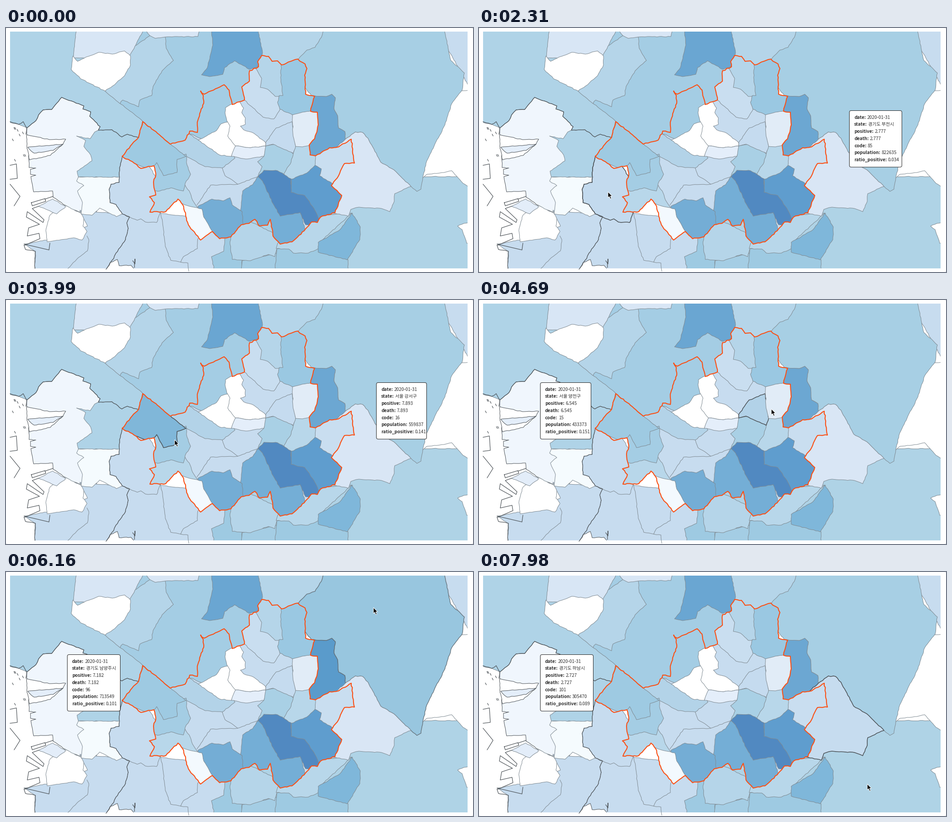
Animation of 1032 by 542 pixels, one loop 8 s. Source, as a matplotlib script:

```python
import math
import random

import numpy as np
import matplotlib.pyplot as plt
from matplotlib.animation import FuncAnimation
from matplotlib.patches import FancyBboxPatch, Polygon, Rectangle
from matplotlib.path import Path

W, H, DPI = 1032, 542, 100
PX = 72 / DPI
STEP, FRAMES, TICK = 40, 200, 70
THIN, DARK, RIM = "#7f8a92", "#4c5257", "#fb4f14"
PALE, SKY, MIST = "#c7dcef", "#a4cde4", "#b5d5e9"

fig = plt.figure(figsize=(W / DPI, H / DPI), dpi=DPI, facecolor="#e6e6e6")
ax = fig.add_axes([0, 0, 1, 1])
ax.set(xlim=(0, W), ylim=(H, 0))
ax.axis("off")
ax.add_patch(FancyBboxPatch((4, 4), W - 8, H - 8, boxstyle="round,pad=4,rounding_size=4",
                            fc="white", ec="none", zorder=0))
view = Rectangle((9, 8), 1011, 526, transform=ax.transData)


def pts(*flat):
    return [tuple(p) for p in np.reshape(flat, (-1, 2))]


def rough(points, amp=0.8):
    """Add small natural wiggles; an edge looks the same from both sides."""
    out = []
    for a, b in zip(points, points[1:]):
        lo, hi = sorted((a, b))
        n = max(1, int(math.dist(a, b) / 5))
        rng = random.Random(str((*map(int, lo), *map(int, hi))))
        mids = [(lo[0] + (hi[0] - lo[0]) * k / n + rng.uniform(-amp, amp),
                 lo[1] + (hi[1] - lo[1]) * k / n + rng.uniform(-amp, amp))
                for k in range(1, n)]
        out += [a] + (mids if lo == a else mids[::-1])
    return out + [points[-1]]


layer = 1
clip = None
hover = {}


def area(color, points, key=None, hot=None, amp=0.8, edge=THIN):
    """Add a district above all earlier ones, with an optional hover copy."""
    global layer
    layer += 1
    shape = rough(points + points[:1], amp)
    styles = [(color, edge, 1, 0)]
    if key:
        styles.append((hot, DARK, 1.5, 0.5))
    for fill, stroke, width, dz in styles:
        p = ax.add_patch(Polygon(shape, fc=fill, ec=stroke, lw=width * PX,
                                 zorder=layer + dz, joinstyle="round"))
        if clip:
            p.set_clip_path(clip, ax.transData)
        else:
            p.set_clip_path(view)
        if dz:
            p.set_visible(False)
            hover[key] = p


def line(points, color=DARK, lw=1.2, amp=0.8, z=90):
    xs, ys = zip(*rough(points, amp))
    ax.plot(xs, ys, color=color, lw=lw * PX, zorder=z, solid_joinstyle="round",
            clip_path=view)


# ---- shared borders
gimpo_s = pts(46, 222, 66, 206, 72, 193, 82, 182, 101, 181, 123, 154, 155, 167, 172, 173,
              170, 180, 187, 186, 185, 196, 208, 219, 204, 227)
gyeyang_n = pts(204, 227, 234, 226, 256, 242, 268, 236, 292, 243)
bucheon_w = pts(257, 285, 251, 310, 250, 343, 232, 347, 228, 358, 230, 388, 243, 392, 257, 413)
namdong_e = pts(257, 413, 273, 420, 267, 433, 270, 445, 264, 470, 243, 500, 238, 512, 221, 536)
hanam_n = pts(750, 247, 772, 231, 788, 232, 800, 245, 828, 298, 857, 315, 895, 352)
guri_e = pts(675, 150, 708, 152, 720, 147, 728, 155, 725, 180, 733, 195, 735, 222,
             749, 230, 750, 247)
rim_n = pts(257, 285, 275, 262, 293, 243, 302, 208, 363, 258, 396, 249, 406, 229, 423, 232,
            424, 205, 437, 167, 436, 150, 430, 140, 438, 147, 482, 126, 493, 138, 500, 170,
            527, 160, 521, 131, 538, 118, 538, 95, 558, 86, 556, 75, 565, 61, 580, 63,
            588, 74, 600, 73, 609, 82, 645, 69, 661, 80, 665, 90, 660, 105, 662, 147,
            682, 152, 673, 185, 688, 187, 690, 215, 682, 246)
rim_s = pts(670, 260, 672, 282, 684, 284, 715, 266, 735, 264, 763, 247, 770, 300, 748, 301,
            735, 328, 719, 350, 742, 372, 727, 410, 695, 420, 688, 432, 675, 431, 652, 458,
            632, 475, 606, 480, 590, 462, 584, 425, 578, 438, 560, 440, 550, 425, 537, 434,
            520, 437, 497, 464, 472, 468, 456, 452, 430, 471, 403, 437, 390, 392, 380, 380)
rim_w = pts(353, 408, 318, 409, 328, 388, 317, 375, 331, 371, 326, 342, 331, 327, 327, 306,
            298, 312, 283, 300, 257, 285)
rim = rim_n + rim_s + rim_w

# ---- north and west
area("#afd3e7", pts(0, 208, 0, 0, 160, 0, 302, 207, 292, 243, 150, 300, 46, 222, 28, 214))
area(SKY, pts(219, 140, 302, 207, 363, 258, 450, 300, 620, 160, 600, 0, 160, 0))
area("#d8e6f5", pts(156, 0, 148, 66, 270, 70, 306, 0))
area(MIST, pts(274, 60, 285, 40, 318, 17, 352, 20, 354, 45, 370, 72, 345, 95, 325, 130,
               322, 150, 296, 160, 293, 175, 258, 160, 252, 168, 219, 140))
area("#ffffff", pts(148, 62, 158, 74, 182, 63, 205, 54, 235, 58, 262, 51, 275, 62, 275, 82,
                    262, 106, 240, 126, 219, 140, 165, 113, 144, 92))
area("#d8e6f5", pts(303, 0, 318, 17, 330, 23, 352, 20, 424, 19, 428, 0))
area(MIST, pts(555, 0, 565, 100, 660, 90, 720, 0))
area("#6aa6d2", pts(454, 0, 457, 38, 445, 88, 432, 104, 450, 108, 479, 103, 483, 88, 505, 73,
                    538, 92, 556, 86, 567, 55, 556, 0))
area("#f0f6fd", gimpo_s + pts(200, 420, 145, 403, 104, 376, 103, 362, 61, 364, 55, 330,
                              66, 327, 54, 325, 54, 314, 66, 311, 51, 310, 50, 264, 46, 236),
     edge=DARK)
area("#ffffff", pts(46, 237, 96, 248, 132, 247, 126, 258, 98, 283, 52, 293, 46, 262), edge=DARK)
area("#e4eefa", pts(48, 265, 90, 261, 126, 258, 104, 272, 62, 278), edge=DARK)
area("#afd3e7", gyeyang_n + pts(300, 290, 260, 332, 160, 331, 157, 318, 190, 295, 187, 282,
                                172, 263, 176, 250, 156, 240, 186, 246, 196, 231))

# ---- south and east
area("#afd3e6", pts(500, 330, 1040, 330, 1040, 550, 450, 550))
area(PALE, pts(240, 400, 500, 430, 480, 545, 210, 545))
area(PALE, namdong_e + pts(64, 545, 64, 496, 40, 480, 95, 470, 180, 440, 163, 405))
area("#f5fbfe", pts(160, 331, 255, 331, 257, 413, 244, 419, 207, 400, 190, 416, 166, 413,
                    169, 388, 158, 362, 172, 350, 156, 340))
area("#ffffff", pts(97, 416, 130, 394, 165, 411, 172, 424, 170, 440, 179, 452, 168, 471,
                    150, 466, 91, 475, 88, 450))
area("#e3edf9", pts(72, 396, 103, 380, 132, 397, 112, 413))
line(pts(179, 462, 183, 470, 180, 495, 160, 510, 137, 534), THIN, 1, z=layer)
line(pts(341, 408, 346, 432, 352, 485, 364, 516, 386, 520, 392, 508, 423, 490, 424, 468),
     THIN, 1, z=layer)
line(pts(386, 520, 402, 522, 404, 540), THIN, 1, z=layer)
area("#ffffff", pts(221, 538, 230, 521, 246, 514, 250, 528, 276, 527, 286, 540), edge=DARK)
area("#9ecae2", pts(484, 460, 481, 496, 454, 508, 462, 545, 522, 545, 520, 460))
area(SKY, pts(522, 517, 520, 545, 610, 545, 600, 500))
area("#9ecae2", pts(594, 545, 598, 490, 700, 480, 756, 515, 756, 545))
area(MIST, pts(497, 455, 495, 480, 500, 514, 540, 517, 580, 503, 594, 508, 598, 492,
               620, 470, 520, 420))
area("#b8d7ea", pts(604, 470, 597, 490, 625, 491, 635, 500, 668, 500, 690, 490, 700, 470,
                    764, 411, 640, 420))
area("#7fb7da", pts(765, 411, 783, 442, 782, 470, 754, 515, 690, 498, 690, 476, 738, 448))
area(PALE, pts(950, 0, 1040, 0, 1040, 160))
area("#ffffff", pts(1040, 139, 980, 139, 900, 300, 921, 333, 930, 325, 968, 321, 985, 317,
                    1010, 345, 1040, 364), amp=0.4)
area("#ffffff", pts(1040, 428, 1012, 434, 998, 440, 1008, 448, 1018, 478, 1040, 478))
area(PALE, bucheon_w + pts(290, 427, 298, 424, 308, 431, 333, 432, 341, 408, 360, 380,
                           300, 280), "bucheon", "#c3daee")
area("#6ca7d2", guri_e + pts(740, 275, 660, 295, 650, 170), "guri", "#4a90c5")
area("#a7cfe4", guri_e + hanam_n
     + pts(908, 363, 917, 358, 921, 333, 930, 295, 970, 215, 985, 168, 1008, 138, 1013, 100,
           983, 72, 977, 45, 968, 0, 702, 0, 699, 15, 683, 43, 665, 49, 647, 68, 630, 90),
     "namyang", "#8abedc")
area("#d9e6f5", hanam_n + pts(859, 368, 858, 385, 848, 408, 830, 401, 780, 398, 762, 403,
                              757, 418, 722, 411, 690, 400, 690, 300),
     "hanam", "#c6dcef")

# ---- inner districts, clipped to the rim
clip = Path(rough(rim, 1.1))
area(PALE, rim)
line(pts(422, 393, 452, 349, 512, 347, 557, 330), THIN, 1, z=layer)
line(pts(478, 311, 484, 328, 512, 347), THIN, 1, z=layer)
area(SKY, pts(390, 225, 420, 110, 510, 110, 515, 165, 490, 240, 440, 250, 403, 233))
area("#b3d3e8", pts(350, 255, 390, 230, 403, 233, 425, 249, 490, 265, 506, 289, 478, 311,
                    440, 308, 398, 285))
area("#c9def0", pts(510, 160, 510, 110, 550, 75, 600, 100, 606, 180, 592, 202, 568, 198,
                    527, 160))
area(MIST, pts(545, 80, 565, 50, 630, 70, 625, 150, 595, 152, 578, 136, 562, 132, 565, 112,
               557, 98))
area("#9ac8e2", pts(609, 70, 660, 55, 700, 140, 680, 190, 633, 193, 605, 180, 600, 165,
                    604, 150, 612, 150, 607, 110))
area("#ffffff", pts(425, 249, 465, 228, 475, 213, 500, 206, 510, 262, 498, 285, 472, 282))
area("#ffffff", pts(484, 188, 485, 177, 515, 160, 525, 178, 521, 188, 529, 200, 529, 214,
                    518, 218, 525, 226, 548, 234, 574, 255, 574, 262, 540, 266, 507, 262,
                    490, 240, 495, 218, 488, 206))
area("#e4eefa", pts(507, 262, 540, 266, 574, 262, 575, 270, 570, 285, 530, 291, 498, 285,
                    500, 278))
area("#a9d0e5", pts(574, 262, 610, 255, 645, 290, 620, 330, 556, 332, 566, 308, 556, 297,
                    570, 285))
area("#b8d7ea", pts(635, 278, 640, 255, 690, 255, 690, 310, 630, 345, 614, 324, 630, 298))
area("#c9def0", pts(684, 275, 775, 230, 785, 310, 730, 355, 690, 330, 683, 305))
area("#74aed6", pts(523, 362, 545, 348, 557, 330, 650, 400, 665, 470, 600, 495, 515, 445))
area("#5f9dce", pts(630, 336, 665, 322, 683, 305, 697, 313, 693, 328, 755, 365, 745, 420,
                    690, 440, 630, 380))
area("#5189c1", pts(557, 330, 570, 316, 600, 317, 630, 335, 630, 365, 660, 372, 680, 400,
                    700, 440, 662, 437, 650, 410, 606, 418, 590, 390, 567, 340))
area("#74add5", pts(424, 396, 455, 380, 480, 384, 495, 377, 500, 393, 522, 408, 524, 445,
                    500, 475, 440, 475))
area("#b8d7ea", pts(320, 345, 392, 345, 405, 362, 412, 382, 424, 400, 390, 430, 300, 420))
area("#f3f9fe", pts(375, 385, 410, 397, 433, 402, 437, 420, 456, 452, 460, 480, 415, 485))
area(SKY, pts(310, 300, 398, 280, 400, 304, 408, 325, 396, 345, 392, 362, 365, 355, 340, 362,
              315, 362), "yangcheon", "#86bcdc")
area("#9ecae2", pts(302, 195, 363, 257, 398, 285, 378, 292, 378, 321, 348, 328, 333, 299,
                    320, 315, 240, 285), "gangseo", "#80b7d9")
area("#c5dbef", pts(632, 208, 608, 218, 597, 222, 574, 254, 574, 262, 590, 258, 635, 278,
                    640, 263), "dongdaemun", "#b2d2e8")
area("#e1ecf7", pts(633, 193, 655, 187, 700, 180, 690, 258, 655, 264, 640, 263, 634, 235),
     "jungnang", "#d8e5f4")

# ---- strong borders, coast and harbour
line(rim, RIM, 2.1, 1.1, 95)
line(gimpo_s + gyeyang_n[1:])
line(bucheon_w + namdong_e[1:])
line(pts(9, 208, 28, 214, 38, 208, 46, 222, 44, 236))
line(pts(9, 305, 23, 302, 25, 334, 9, 336), amp=0)
line(pts(9, 347, 31, 374, 18, 395), amp=0)
line(pts(56, 388, 86, 379, 88, 385, 58, 395, 56, 388), amp=0)
line(pts(86, 380, 104, 374), amp=0)
line(pts(72, 396, 58, 401, 84, 426, 82, 432, 47, 408, 45, 420, 74, 436, 50, 444, 47, 462,
         73, 456, 75, 468, 40, 483), amp=0)
line(pts(40, 480, 95, 493, 97, 478), amp=0)
line(pts(40, 483, 43, 492, 65, 496, 64, 534))
line(pts(280, 517, 285, 524, 285, 513, 284, 532), amp=0.5)
rng = random.Random(4)
for _ in range(9):
    x, y = rng.uniform(12, 44), rng.uniform(212, 298)
    line([(x, y), (x + 2, y + 4)], amp=0)

# ---- tooltip
TIPS = {
    "bucheon": ("경기도 부천시", 2.777, 85, 822635, 117),
    "gangseo": ("서울 강서구", 7.893, 16, 559837, 112),
    "yangcheon": ("서울 양천구", 6.545, 15, 433373, 113),
    "jungnang": ("서울 중랑구", 2.174, 7, 380307, 117),
    "guri": ("경기도 구리시", 9.524, 94, 203553, 117),
    "namyang": ("경기도 남양주시", 7.182, 96, 713549, 118),
    "hanam": ("경기도 하남시", 2.727, 101, 305470, 118),
}
KEYS = ("date", "state", "positive", "death", "code", "population", "ratio_positive")
FONT = dict(family="Noto Sans CJK JP", size=10 * PX, color="#333333", zorder=101)

box = ax.add_patch(FancyBboxPatch((0, 0), 1, 1, boxstyle="round,pad=0,rounding_size=4",
                                  fc="white", ec="#222222", lw=PX, zorder=100))
renderer = fig.canvas.get_renderer()
labels, values, offsets = [], [], []
for i, key in enumerate(KEYS):
    y = 201.6 + 15.75 * i
    label = ax.text(0, y, key + ":", weight="bold", **FONT)
    offsets.append(label.get_window_extent(renderer).width + 2.5)
    labels.append(label)
    values.append(ax.text(0, y, "", **FONT))

# ---- pointer
ARROW = np.array(pts(0, 0, 0, 13, 3, 10.4, 5.2, 15.6, 7.5, 14.6, 5.3, 9.6, 9.2, 9.4))
pointer = ax.add_patch(Polygon(ARROW, fc="black", ec="white", lw=PX, zorder=110))

MOVES = (
    (980, 1190, pts(335, 333, 277, 366, 285, 364)),
    (2940, 3710, pts(285, 364, 366, 312)),
    (3990, 4690, pts(366, 312, 646, 242)),
    (5320, 6090, pts(646, 242, 704, 225, 812, 79)),
    (6720, 7070, pts(812, 79, 789, 338)),
    (7140, 7210, pts(789, 338, 781, 366)),
    (7770, 7980, pts(781, 366, 858, 471)),
)
HOVERS = ((1750, "bucheon"), (3150, "yangcheon"), (3290, "gangseo"), (4130, "yangcheon"),
          (4480, "dongdaemun"), (4830, "jungnang"), (5740, "guri"), (6160, "namyang"),
          (7140, "hanam"))
FLIP = 4130


def ramp(t, start, span):
    return min(1.0, max(0.0, (t - start + TICK) / span))


def pointer_at(t):
    pos = MOVES[0][2][0]
    for start, end, path in MOVES:
        if t >= start:
            u = ramp(t, start, end - start + TICK)
            u = u * u * (3 - 2 * u)
            knots = np.linspace(0, 1, len(path))
            pos = [np.interp(u, knots, axis) for axis in zip(*path)]
    return pos


def show_tip(t):
    seen = [k for start, k in HOVERS if start <= t and k in TIPS]
    for artist in (box, *labels, *values):
        artist.set_visible(bool(seen))
        artist.set_alpha(ramp(t, HOVERS[0][0], 630))
    if not seen:
        return
    state, cases, code, people, width = TIPS[seen[-1]]
    left = 818.5 if t < FLIP else 135.5
    box.set_bounds(left, 183.5, width - 1, 125.5)
    texts = ("2020-01-31", state, f"{cases:.3f}", f"{cases:.3f}", str(code), str(people),
             f"{cases / people * 1e4:.3f}")
    for label, value, dx, text in zip(labels, values, offsets, texts):
        label.set_x(left + 10.5)
        value.set_x(left + 10.5 + dx)
        value.set_text(text)


def draw(i):
    t = (i * STEP + 30) // TICK * TICK
    glow = dict.fromkeys(hover, 0.0)
    for n, (start, key) in enumerate(HOVERS):
        end = HOVERS[n + 1][0] if n + 1 < len(HOVERS) else 9000
        if t >= start:
            glow[key] = max(glow[key], ramp(t, start, 140) - ramp(t, end, 140))
    for key, patch in hover.items():
        patch.set_visible(glow[key] > 0)
        patch.set_alpha(glow[key])
    show_tip(t)
    pointer.set_visible(t >= MOVES[0][0])
    pointer.set_xy(ARROW + pointer_at(t))
    return []


anim = FuncAnimation(fig, draw, frames=FRAMES, interval=STEP, repeat=True,
                     init_func=lambda: [], cache_frame_data=False)
plt.show()
```
